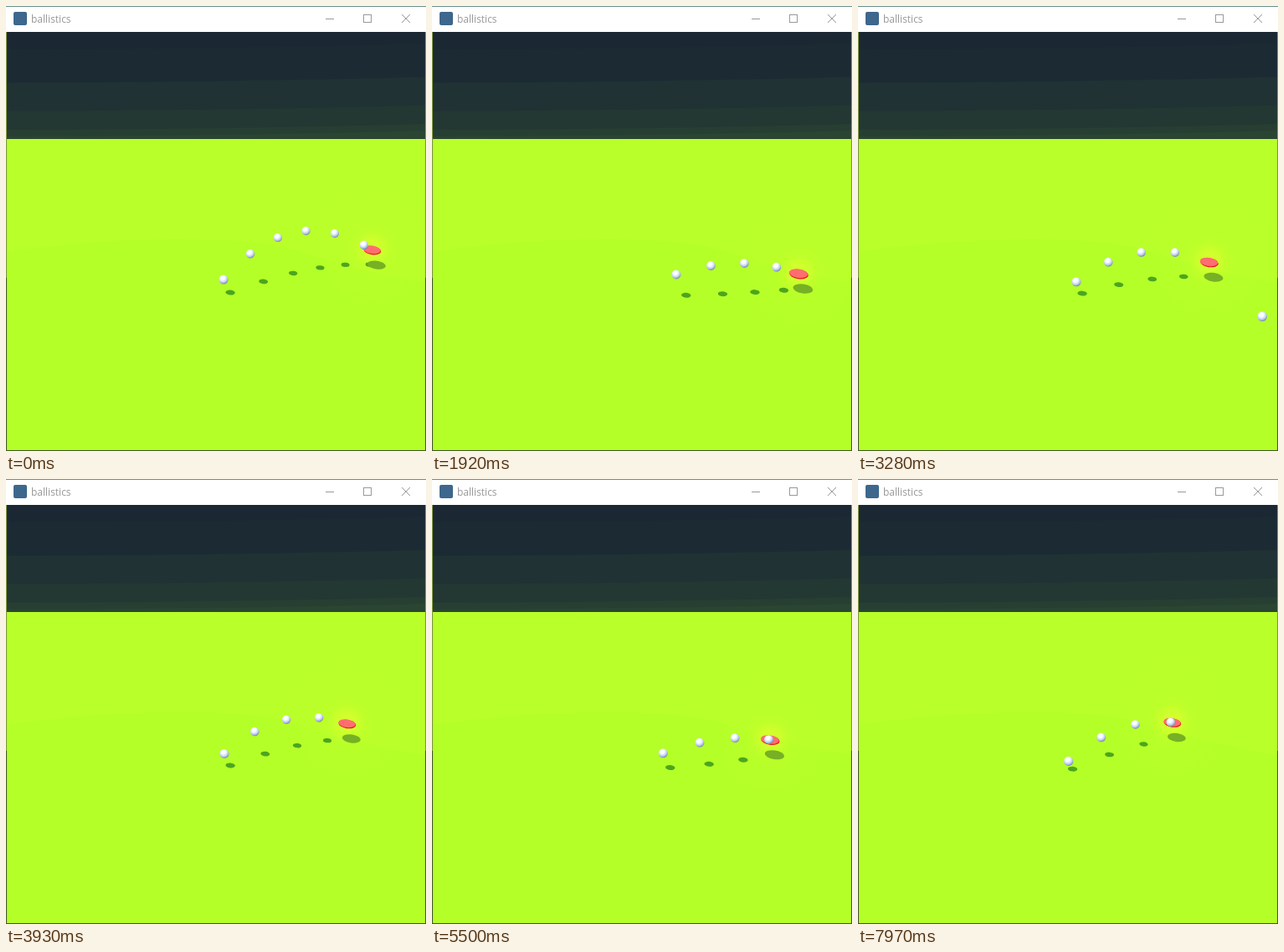
Write an HTML page with a canvas that moves like this. It is 502 by 532 pixels and loops after 8000 ms.

```html
<!DOCTYPE html>
<html lang="en">
<head>
<meta charset="utf-8">
<title>ballistics</title>
<style>
  html, body { margin: 0; width: 100%; height: 100%; overflow: hidden; background: #fff; }
  canvas, .bar { position: absolute; left: 0; top: 0; }
  .bar { width: 502px; height: 31px; font: 12px/32px "Open Sans", "Noto Sans", sans-serif; color: #999; }
  .icon { position: absolute; left: 9px; top: 7px; width: 16px; height: 16px; border-radius: 2px; background: #3d678c; }
  .name { position: absolute; left: 30px; top: 0; white-space: nowrap; }
  svg { position: absolute; left: 0; top: 0; fill: none; stroke: #999; }
</style>
</head>
<body>
<canvas id="stage" width="502" height="532"></canvas>
<div class="bar">
  <div class="icon"></div>
  <span class="name">ballistics</span>
  <svg width="502" height="31">
    <path d="M382 15.5h10M427.5 10.5h9v9h-9z" shape-rendering="crispEdges"/>
    <path d="M473 10l10 10M483 10l-10 10"/>
  </svg>
</div>
<script>
const ctx = document.getElementById('stage').getContext('2d');
const LOOP = 8;
const STEP = 0.2156;                 // seconds between shots; speeds are per step
const MUZZLE = { x: 251, y: 338 };
const GRAVITY = 10, SPEED_SQUARED = 2290, DEPTH = 40;
const TURN = 0.29, SWEEP = 1.985;    // the disc turns round every SWEEP seconds
const REACTION = 0.083;              // the gun notices a turn this late

// The disc shuttles between far (0) and near (1) while it drifts left.
const sweepAt = t => (((t - TURN) / SWEEP) % 2 + 2) % 2;
const nearness = t => 1 - Math.abs(1 - sweepAt(t));
const place = (t, near) => ({
  x: MUZZLE.x + (183 - 7.6 * t) * (1 + 0.135 * near),
  y: 285.5 + 42 * near
});
const discAt = t => place(t, nearness(t));

// Low arc at fixed speed towards the place where the disc seems to be heading.
function aim(start) {
  const heading = sweepAt(start - REACTION) < 1 ? 1 : -1;
  let steps = 4, goal;
  for (let i = 0; i < 6; i++) {
    const arrival = start + steps * STEP;
    const near = nearness(start) + heading * (arrival - start) / SWEEP;
    goal = place(arrival, near);
    const range = Math.hypot(214 - 10 * arrival, DEPTH * (1 - near));
    const spare = Math.max(0, SPEED_SQUARED ** 2 - (GRAVITY * range) ** 2);
    steps = Math.sqrt((SPEED_SQUARED - Math.sqrt(spare)) / (GRAVITY ** 2 / 2));
  }
  return {
    start, steps, goal,
    vx: (goal.x - MUZZLE.x) / steps,
    vy: (goal.y - MUZZLE.y) / steps - GRAVITY / 2 * steps,
    climb: 4.2 * steps + 9 / steps
  };
}

const drop = start => ({ start, vx: 0, vy: 0, climb: 0 });

function ballAt(ball, t) {
  const a = (t - ball.start) / STEP;
  return {
    x: MUZZLE.x + ball.vx * a,
    y: MUZZLE.y + ball.vy * a + GRAVITY / 2 * a * a,
    height: 9 + ball.climb * a - 4.2 * a * a
  };
}

// A ball ends on the disc, or a little below the ground.
function withEnd(ball) {
  const { climb, start, steps, goal } = ball;
  const landing = (climb + Math.sqrt(climb ** 2 + 4 * 4.2 * 15)) / (2 * 4.2);
  const disc = goal && discAt(start + steps * STEP);
  const hit = goal && Math.hypot(disc.x - goal.x, disc.y - goal.y) < 12;
  return { ...ball, end: start + STEP * (hit ? steps : climb ? landing : 1.5) };
}

const shots = (from, count, shoot) =>
  Array.from({ length: count }, (_, i) => withEnd(shoot(from + i * STEP)));

// The gun jams for two shots between the bursts.
const RESUME = 1.068;
const balls = [
  ...shots(0.37 - 8 * STEP, 9, aim),
  ...shots(RESUME - 2 * STEP, 2, drop),
  ...shots(RESUME, 33, aim)
];

function ellipse(x, y, rx, ry, tilt, fill) {
  ctx.fillStyle = fill;
  ctx.beginPath();
  ctx.ellipse(x, y, rx, ry, tilt, 0, Math.PI * 2);
  ctx.fill();
}

function radial(x, y, r, ...colors) {
  const g = ctx.createRadialGradient(x, y, 0, x, y, r);
  colors.forEach((color, i) => g.addColorStop(i / (colors.length - 1), color));
  return g;
}

function drawSky() {
  ctx.fillStyle = '#1b2833';
  ctx.fillRect(0, 31, 502, 128);
  for (let i = 0; i < 5; i++) {
    const y = 52 + 104 * Math.sin(i * Math.PI / 8);
    ctx.fillStyle = `rgb(${28 + 3.5 * i}, ${43 + 6.5 * i}, ${51 - 0.3 * i})`;
    ctx.beginPath();
    ctx.moveTo(0, y);
    ctx.quadraticCurveTo(300, y - 1, 502, y - 7);
    ctx.lineTo(502, 159);
    ctx.lineTo(0, 159);
    ctx.fill();
  }
}

function drawGround() {
  ctx.fillStyle = '#b9ff29';
  ctx.fillRect(0, 159, 502, 373);
  ctx.fillStyle = '#b4ff28';
  ctx.beginPath();
  ctx.moveTo(0, 294);
  ctx.bezierCurveTo(110, 278, 270, 270, 350, 293);
  ctx.quadraticCurveTo(430, 320, 502, 330);
  ctx.lineTo(502, 532);
  ctx.lineTo(0, 532);
  ctx.fill();
}

function drawGlow({ x, y }) {
  ellipse(x, y, 90, 90, 0, radial(x, y, 90, 'rgba(200,255,44,.4)', 'rgba(190,255,42,.25)', 'rgba(185,255,41,0)'));
  ellipse(x, y - 1, 27, 27, 0, radial(x, y - 1, 27, 'rgba(222,255,48,.9)', 'rgba(210,255,44,.7)', 'rgba(192,255,41,0)'));
}

function drawDisc({ x, y }) {
  const r = 10.4 + (y - 290) * 0.034;
  ellipse(x + 5.3, y + 18, r + 0.6, r * 0.48, 0.14, '#76b024');
  ellipse(x + 0.3, y + 0.6, r, r * 0.49, 0.14, '#e5121c');
  ellipse(x - 0.1, y - 0.3, r - 0.2, r * 0.46, 0.14, '#ff6d70');
}

function drawShadow({ x, y, height }) {
  if (height < 2) return;
  const lean = 0.53 - 0.00135 * (x - MUZZLE.x);
  const r = 5.7 - Math.max(0, MUZZLE.y - y - height) * 0.025;
  ellipse(x + height * lean, y + height, r, r * 0.52, 0.08, '#4ca51f');
}

function drawBall({ x, y }) {
  const r = 5.6 - (MUZZLE.y - y) * 0.008;
  ellipse(x, y, r, r, 0, radial(x - 1, y - 2, r + 2.6, '#fff', '#f6f9ff', '#bccbf0', '#5a7599'));
}

function drawFrame() {
  ctx.fillStyle = '#fff';
  ctx.fillRect(0, 0, 502, 31);
  ctx.fillStyle = '#6c8f8c';
  ctx.fillRect(0, 0, 502, 1);
  for (const x of [0, 501]) {
    ctx.fillStyle = '#7d9440';
    ctx.fillRect(x, 31, 1, 294);
    ctx.fillStyle = '#42542c';
    ctx.fillRect(x, 325, 1, 207);
  }
  ctx.fillRect(0, 531, 502, 1);
}

function render(t) {
  const disc = discAt(t);
  const flying = balls.filter(b => t >= b.start && t < b.end).map(b => ballAt(b, t));
  drawSky();
  drawGround();
  drawGlow(disc);
  flying.forEach(drawShadow);
  drawDisc(disc);
  flying.forEach(drawBall);
  drawFrame();
}

function tick() {
  render((performance.now() / 1000) % LOOP);
  requestAnimationFrame(tick);
}
tick();
</script>
</body>
</html>
```
